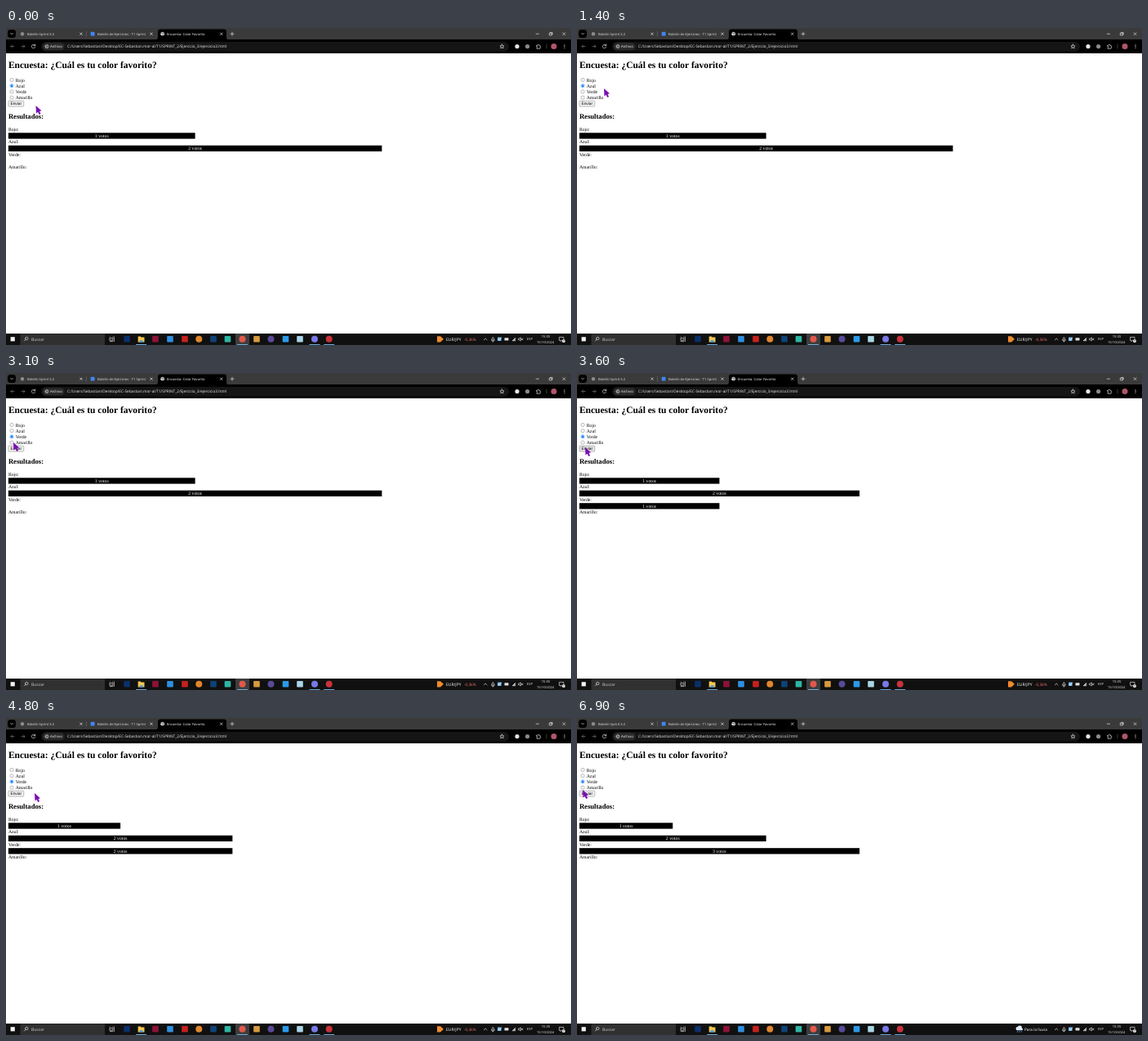
An HTML page that plays this animation: 692x388 px, repeating every 7.1 s.

```html
<!DOCTYPE html>
<html lang="es">
<head>
<meta charset="utf-8">
<title>Encuesta: Color Favorito</title>
<style>
html, body { margin: 0; width: 100%; height: 100%; overflow: hidden; background: #fff; }
svg { display: block; width: 100%; height: 100%; }
text { text-rendering: geometricPrecision; white-space: pre; }
.ui { font-family: "Open Sans", "Noto Sans", sans-serif; }
.page { font-family: "Liberation Serif", "Times New Roman", serif; }
.btn { font-family: "Liberation Sans", Arial, sans-serif; }
.line { fill: none; stroke-width: .7; stroke-linecap: round; stroke-linejoin: round; }
</style>
</head>
<body>
<svg id="stage" viewBox="0 0 692 388"></svg>
<script>
const stage = document.getElementById('stage');
const LOOP = 7100, STEP = 100;

function add(tag, attrs, parent = stage) {
  const el = document.createElementNS('http://www.w3.org/2000/svg', tag);
  for (const key in attrs) el.setAttribute(key, attrs[key]);
  return parent.appendChild(el);
}
const rect = (x, y, width, height, fill, rx = 0, parent) =>
  add('rect', { x, y, width, height, fill, rx }, parent);
const circle = (cx, cy, r, fill, parent) => add('circle', { cx, cy, r, fill }, parent);
const line = (d, stroke = '#ddd', parent) => add('path', { d, stroke, class: 'line' }, parent);
function text(str, x, y, size, fill, cls = 'ui', extra = {}, parent) {
  const el = add('text', { x, y, 'font-size': size, fill, class: cls, ...extra }, parent);
  el.textContent = str;
  return el;
}
const cross = (x, y, r, color) =>
  line(`M${x - r} ${y - r}l${2 * r} ${2 * r}m0 ${-2 * r}l${-2 * r} ${2 * r}`, color);
const MID = { 'text-anchor': 'middle' };

function drawBrowser() {
  rect(0, 0, 692, 15, '#3a3a3a');
  rect(0, 14, 692, 17, '#000');
  add('path', { d: 'M182 14.5Q186 14.5 186 11V4.5Q186 1.5 189 1.5H267Q270 1.5 270 4.5V11Q270 14.5 274 14.5Z', fill: '#000' });

  rect(2, 2, 10, 10, '#000', 3.5);
  line('M5.6 6.4l1.4 1.4 1.4-1.4');
  circle(20, 7.2, 2.2, '#8c8c8c');
  text('Boletín Sprint 3.2', 26, 8.8, 4.13, '#e4e4e4');
  rect(103.7, 4.8, 4.8, 4.8, '#4285f4', .6);
  text('Boletín de Ejercicios - T1 Sprint', 112, 8.8, 4.13, '#e4e4e4');
  line('M98.5 4.5v5.5', '#666');
  circle(191.7, 7.2, 2.4, '#ddd');
  line('M189.8 6.2h2l.8 1.4-1 1.6M192.4 5.1l1.4 1.2', '#333');
  text('Encuesta: Color Favorito', 197, 8.8, 4.13, '#fff');
  for (const x of [92, 178, 263.7]) cross(x, 7.2, 1.3, '#e4e4e4');
  line('M275 7.2h4M277 5.2v4');
  line('M649.2 7.2h3.4');
  line('M665.7 6.3h2.6v2.6h-2.6zM666.6 6.3v-.9h2.6v2.6h-.9');
  cross(683.5, 7.2, 1.5, '#ddd');

  line('M10 22.5h-4m1.8-1.8l-1.8 1.8 1.8 1.8', '#777');
  line('M19 22.5h4m-1.8-1.8l1.8 1.8-1.8 1.8', '#777');
  line('M35.5 21.4a2.2 2.2 0 1 0 .2 1.8M35.8 19.9v1.7h-1.7');
  rect(43, 17, 573, 11.4, '#151515', 5.7);
  rect(45, 18.2, 26.5, 9, '#2b2b2b', 4.5);
  line('M48 22.6a2 2 0 1 0 4 0a2 2 0 1 0-4 0M50 22.4v1.1M50 21.4v.1');
  text('Archivo', 54, 24.2, 4.25, '#fff');
  text('C:/Users/Sebastian/Desktop/EC-Sebastian.mor-al/T1/SPRINT_2/Ejercicio_3/ejercicio3.html',
    75, 24.3, 4.73, '#f0f0f0');
  line('M607.5 20l.75 1.7 1.8.2-1.35 1.2.4 1.8-1.6-.95-1.6.95.4-1.8-1.35-1.2 1.8-.2z');
  circle(626, 22.6, 2.6, '#e8e8e8');
  circle(638.6, 22.6, 2.6, '#8a8a8a');
  line('M650 21.2h1.2a.8.8 0 0 1 1.6 0h1.2v1.2a.8.8 0 0 1 0 1.6v1.2h-4v-1.2a.8.8 0 0 0 0-1.6z');
  line('M662 20v5', '#555');
  circle(671, 22.6, 3.5, '#b0566a');
  for (let i = -1; i < 2; i++) circle(684, 22.6 + i * 1.7, .55, '#ddd');
}

function drawTaskbar() {
  rect(0, 374, 692, 14, '#101010');
  rect(5.6, 378.2, 5.2, 5.2, '#f2f2f2');
  rect(17.5, 374.4, 103.5, 13.6, '#303030');
  line('M23.6 380a1.7 1.7 0 1 0 3.4 0a1.7 1.7 0 1 0-3.4 0M24 381.3l-1.6 1.7');
  text('Buscar', 31, 382.8, 5, '#d0d0d0');
  line('M127.3 379.6h3.6v2.6h-3.6zM127.3 378v.2M130.9 378v.2M127.3 383.6h3.6M132.4 378v5.6');

  rect(281, 374, 17, 14, '#3d3d3d');
  const apps = [
    [148, '#0b2f6b'], [183, '#8f1238'], [201, '#2f8fe0'], [219, '#c8201c'],
    [236.3, '#e0862c', 1], [254, '#0d4378'], [271.5, '#2db6a3'], [289.5, '#e2574c', 1],
    [307, '#d89a3c'], [324.5, '#584a98', 1], [342.5, '#2b9ae8'], [360, '#a8d4e6'],
    [378, '#7a78e8', 1], [395.7, '#c9323a', 1]
  ];
  for (const [x, color, round] of apps)
    round ? circle(x, 380.8, 4, color) : rect(x - 3.8, 377, 7.6, 7.6, color, .8);
  add('path', { d: 'M161.7 377.6h3l1 1h3.8v6h-7.8z', fill: '#f5c750' });
  rect(163.6, 382.3, 4, 2.3, '#3d9be0');
  for (const x of [165.6, 289.5, 378, 395.7]) rect(x - 6.5, 387.1, 13, .9, '#76b9ed');

  line('M585.4 381.8l1.8-1.8 1.8 1.8');
  line('M595.4 380a1 1.4 0 0 1 2 0v1a1 1.4 0 0 1-2 0zM594.5 381.5a1.9 1.9 0 0 0 3.8 0M596.4 383.3v.8');
  rect(602, 378.6, 4.6, 4.4, '#79b8e8', .6);
  line('M603.2 381l1.1 1 2.4-3', '#fff');
  rect(610.5, 379.2, 5, 3.2, '#ddd', .4);
  for (let i = 0; i < 4; i++) rect(620 + i * 1.1, 382 - i, .8, 1.2 + i, '#ddd');
  line('M628 380h1l1.3-1.2v4.2l-1.3-1.2h-1zM631.4 380l1.6 1.8m0-1.8l-1.6 1.8');
  text('ESP', 638, 382.3, 4, '#eee');
  text('15:35', 661, 379.3, 4.1, '#eee', 'ui', MID);
  text('15/10/2024', 660.7, 386, 4, '#eee', 'ui', MID);
  line('M678 378.4h5v4h-2.6l-1.2 1.2v-1.2h-1.2z');
  circle(683, 383.2, 1.9, '#eee');
  text('5', 683, 384.3, 2.8, '#111', 'ui', MID);
}

function drawTicker() {
  const stock = add('g', {}), rain = add('g', {});
  add('path', { d: 'M528 377.2h4l4 3.6-4 3.6h-4z', fill: '#ef8a2c' }, stock);
  text('EUR/JPY', 539, 382.6, 5, '#fff', 'ui', {}, stock);
  text('-0,36%', 561, 382.6, 4.75, '#f0706c', 'ui', {}, stock);
  circle(539.5, 380, 2, '#dfe9f5', rain);
  circle(542.2, 379.3, 2.7, '#dfe9f5', rain);
  rect(537.8, 379.8, 8.2, 2.4, '#dfe9f5', 1.2, rain);
  line('M539.8 383.2l-.5 1.5M542.2 383.2l-.5 1.5M544.6 383.2l-.5 1.5', '#4aa3f0', rain);
  text('Para la lluvia', 548, 382.6, 4.76, '#fff', 'ui', {}, rain);
  return { stock, rain };
}

const COLORS = ['Rojo', 'Azul', 'Verde', 'Amarillo'];
const FULL = 686.2, LEFT = 2.9;

function drawPage() {
  const bold = { 'font-weight': 'bold' };
  text('Encuesta: ¿Cuál es tu color favorito?', LEFT, 49, 11.53, '#000', 'page', bold);
  text('Resultados:', LEFT, 111, 8.65, '#000', 'page', bold);
  const rows = COLORS.map((name, i) => {
    const y = 63.5 + i * 7.2, top = 128.3 + i * 15.45;
    const ring = add('circle', { cx: 7, cy: y, r: 2.1, fill: '#fff', 'stroke-width': .5 });
    const dot = circle(7, y, 1.3, '#0075ff');
    text(name, 11.7, y + 2.2, 5.77, '#000', 'page');
    text(name + ':', LEFT, top - 2.6, 5.77, '#000', 'page');
    const bar = rect(LEFT, top, 0, 7.3, '#000');
    const label = text('', 0, top + 5.4, 5.77, '#fff', 'page', MID);
    return { ring, dot, bar, label };
  });
  const button = add('rect', { x: 2.9, y: 89.1, width: 18.9, height: 7, rx: 1, stroke: '#767676', 'stroke-width': .45 });
  text('Enviar', 12.3, 94.3, 4.8, '#000', 'btn', MID);
  return { rows, button };
}

drawBrowser();
drawTaskbar();
const ticker = drawTicker();
const page = drawPage();
const cursor = add('path', {
  d: 'M0 0L7 6.2 4.5 6.9 6.1 10 4.1 10.9 2.6 7.8 .5 9.5Z', fill: '#7a10b2'
});

// time, x, y of the pointer tip
const PATH = [
  [0, 36.5, 95], [500, 54, 80.5], [1100, 54, 80.5], [1400, 33, 74], [1700, 14, 70],
  [1900, 8, 72.5], [2200, 8, 79], [2900, 8, 79], [3300, 10, 91], [4300, 10, 91],
  [4600, 73, 92.5], [4800, 35, 92], [5100, 20, 93], [5900, 20, 93], [6600, 9, 83],
  [6900, 7, 88], [LOOP, 7, 88]
];
function pointer(t) {
  const i = PATH.findIndex(p => p[0] > t);
  const [t0, x0, y0] = PATH[i - 1], [t1, x1, y1] = PATH[i];
  const k = (t - t0) / (t1 - t0);
  return [x0 + (x1 - x0) * k, y0 + (y1 - y0) * k];
}

function render(t) {
  const [x, y] = pointer(t);
  cursor.setAttribute('transform', `translate(${x} ${y})`);

  const chosen = t < 2800 ? 1 : 2;
  const green = [3600, 4000, 5300].filter(at => t >= at).length;
  const votes = [1, 2, green, 0];
  const total = 3 + green;
  page.rows.forEach(({ ring, dot, bar, label }, i) => {
    const width = FULL * votes[i] / total;
    ring.setAttribute('stroke', i === chosen ? '#0075ff' : '#767676');
    dot.setAttribute('visibility', i === chosen ? 'visible' : 'hidden');
    bar.setAttribute('width', width);
    label.setAttribute('x', LEFT + width / 2);
    label.textContent = votes[i] ? votes[i] + ' votos' : '';
  });

  const over = x > 2.9 && x < 21.8 && y > 89 && y < 96;
  const pressed = t === 3500 || t === 3900;
  page.button.setAttribute('fill', pressed ? '#f5f5f5' : over ? '#e3e3e3' : '#efefef');

  const rainy = t >= 6700;
  ticker.stock.setAttribute('visibility', rainy ? 'hidden' : 'visible');
  ticker.rain.setAttribute('visibility', rainy ? 'visible' : 'hidden');
}

const start = performance.now();
function tick() {
  const t = (performance.now() - start) % LOOP;
  render(Math.floor(t / STEP) * STEP);
  requestAnimationFrame(tick);
}
tick();
</script>
</body>
</html>
```
